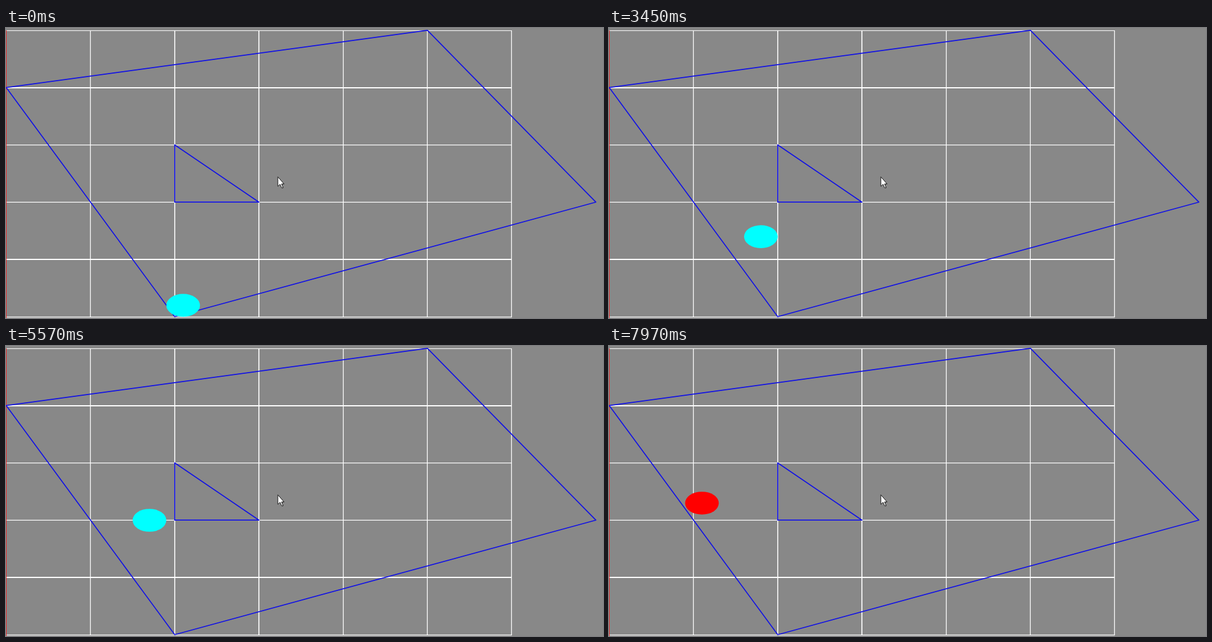
An HTML page that plays this animation: 1008 px wide and 490 px high, repeating every 8 s.

```html
<!DOCTYPE html>
<html lang="en">
<head>
<meta charset="utf-8">
<title>Ellipse moving between obstacles</title>
<style>
  html, body { margin: 0; width: 100%; height: 100%; overflow: hidden; background: #888; }
  svg { display: block; }
</style>
</head>
<body>
<svg id="stage" width="1008" height="490" viewBox="0 0 1008 490">
  <rect width="1008" height="490" fill="#888"/>
  <g id="grid" stroke="#fff"></g>
  <path d="M0.25 4V490" stroke="#f02020" stroke-width="1.3"/>
  <g id="obstacles" fill="none" stroke="#1010e6" stroke-width="1.7" stroke-linejoin="round"></g>
  <ellipse id="ball" rx="28.4" ry="19.35"/>
  <path d="M459 251.5V267.5L462.7 264L465.4 270H468L465.3 263.5H469.5Z"
        fill="#fff" stroke="#111" stroke-width="1"/>
</svg>
<script>
const LOOP = 8000;
const toX = x => 0.5 + 142.2 * x;
const toY = y => 488 - 96.75 * y;

function add(parent, tag, attrs) {
  const node = document.createElementNS("http://www.w3.org/2000/svg", tag);
  for (const key in attrs) node.setAttribute(key, attrs[key]);
  document.getElementById(parent).appendChild(node);
}

// Grid lines: [centre, width]
const columns = [[142.5, 1.3], [284.9, 1.6], [427, 1.7], [569.5, 1.3], [711.4, 1.3], [853.5, 1.3]];
const rows = [[4.5, 1.2], [101, 2], [197.7, 1.3], [294.3, 1.3], [391, 2], [488.4, 1.2]];
for (const [x, w] of columns) add("grid", "path", { d: `M${x} 4V489`, "stroke-width": w });
for (const [y, w] of rows) add("grid", "path", { d: `M0 ${y}H854`, "stroke-width": w });

const polygons = [
  [[0, 4], [5, 5], [7, 2], [2, 0]],
  [[2, 3], [3, 2], [2, 2]]
];
for (const corners of polygons) {
  const points = corners.map(([x, y]) => `${toX(x)},${toY(y) - 0.3}`).join(" ");
  add("obstacles", "polygon", { points });
}

// Evenly spaced key presses: U, L, R move a tenth of a cell, X is a blocked move.
const runs = [
  [420, 420, "U"],
  [830, 1100, "UUU"],
  [1400, 1830, "UUUU"],
  [2130, 2560, "LLLX"],
  [3000, 3880, "UUUUUUL"],
  [4160, 4470, "LLX"],
  [4750, 5730, "UUUURRRX"],
  [6010, 6430, "UUUX"],
  [6870, 7420, "LLLLL"],
  [7690, 7970, "LLX"]
];
const moves = { U: [0, 1], L: [-1, 0], R: [1, 0], X: [0, 0] };

const states = [{ at: 0, x: 21, y: 2, blocked: false }];
for (const [start, end, keys] of runs) {
  [...keys].forEach((key, i) => {
    const last = states[states.length - 1];
    const at = start + (end - start) * i / Math.max(1, keys.length - 1);
    const [dx, dy] = moves[key];
    states.push({ at: Math.round(at / 10) * 10, x: last.x + dx, y: last.y + dy, blocked: key === "X" });
  });
}

const ball = document.getElementById("ball");
function draw(time) {
  const state = states.filter(s => s.at <= time).pop();
  ball.setAttribute("cx", toX(state.x / 10));
  ball.setAttribute("cy", toY(state.y / 10));
  ball.setAttribute("fill", state.blocked ? "#f00" : "#0ff");
}

const begin = performance.now();
function tick() {
  draw((performance.now() - begin) % LOOP);
  requestAnimationFrame(tick);
}
draw(0);
requestAnimationFrame(tick);
</script>
</body>
</html>
```
